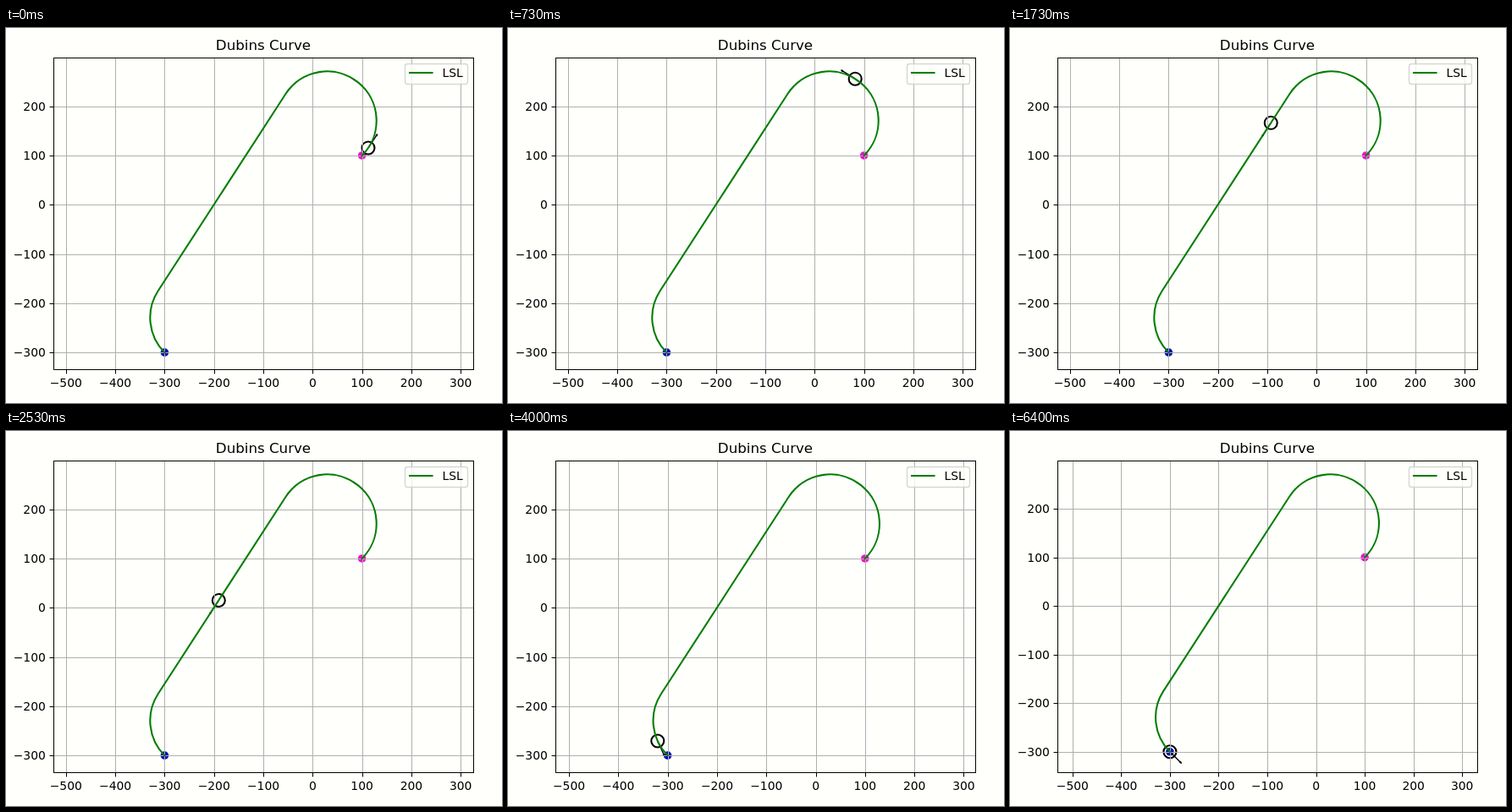
An HTML page for the animation above (6470 ms loop, 586x444 px).

```html
<!DOCTYPE html>
<html lang="en">
<head>
<meta charset="utf-8">
<title>Dubins Curve</title>
<style>
  html, body { margin: 0; width: 100%; height: 100%; overflow: hidden; background: #fffffc; }
  svg { display: block; width: 586px; height: 444px; }
  text { font: 13.89px "DejaVu Sans", sans-serif; fill: #000; }
  .title { font-size: 16.67px; }
  .grid { stroke: #b0b0b0; }
  .tick, .frame { stroke: #000; fill: none; }
  .curve { stroke: #007d00; stroke-width: 2.08; fill: none; stroke-linecap: square; }
</style>
</head>
<body>
<svg id="stage" viewBox="0 0 586 444"></svg>
<script>
const LOOP = 6470, FPS = 15;
const BOX = { left: 56, right: 552, top: 34.6, bottom: 404.2 };
const MARGIN = 0.05, DOT = 5.6, RING = 13.2; // marker extents in data units

// Path: left arc, straight, left arc
const R = 100, A0 = Math.PI / 4, A2 = 7 * Math.PI / 4;
const START = [100, 100], END = [-300, -300];
const arcCentre = ([x, y], a) => [x - R * Math.sin(a), y + R * Math.cos(a)];
const onArc = ([x, y], a) => [x + R * Math.sin(a), y - R * Math.cos(a)];
const C1 = arcCentre(START, A0), C2 = arcCentre(END, A2);
const dx = C2[0] - C1[0], dy = C2[1] - C1[1];
const A1 = Math.atan2(dy, dx) + 2 * Math.PI;
const LEN = [R * (A1 - A0), Math.hypot(dx, dy), R * (A2 - A1)];
const JOIN1 = onArc(C1, A1), JOIN2 = onArc(C2, A1);

// Each segment is sampled every 10 units, closing with the end pose
const STEP = 10;
const poses = [];
for (let s = 0; s < LEN[0]; s += STEP) {
  const a = A0 + s / R;
  poses.push([...onArc(C1, a), a]);
}
for (let s = 0; s < LEN[1]; s += STEP)
  poses.push([JOIN1[0] + s * Math.cos(A1), JOIN1[1] + s * Math.sin(A1), A1]);
for (let s = 0; s < LEN[2]; s += STEP) {
  const a = A1 + s / R;
  poses.push([...onArc(C2, a), a]);
}
poses.push([...END, A2]);

// [tick, pose index]
const PACE = [[0, 2], [5, 9], [16, 25], [26, 41], [50, 76], [60, 92], [63, poses.length - 1]];

function poseAt(n) {
  const k = PACE.findIndex(p => p[0] > n);
  if (k < 0) return poses[poses.length - 1];
  const [n0, i0] = PACE[k - 1], [n1, i1] = PACE[k];
  return poses[Math.round(i0 + (i1 - i0) * (n - n0) / (n1 - n0))];
}

const svg = document.getElementById("stage");
const set = (el, attrs) => {
  for (const k in attrs) el.setAttribute(k, attrs[k]);
  return el;
};
const add = (tag, attrs, text) => {
  const el = set(document.createElementNS("http://www.w3.org/2000/svg", tag), attrs);
  if (text) el.textContent = text;
  return svg.appendChild(el);
};
const snap = v => Math.round(v) + 0.5;
const range = (a, b) => Array.from({ length: (b - a) / 100 + 1 }, (_, i) => a + 100 * i);
const label = v => String(v).replace("-", "\u2212");

const startDot = add("circle", { r: 4.8, fill: "#e619c8" });
const endDot = add("circle", { r: 4.8, fill: "#0a0ab0" });
const ring = add("circle", { r: 7.5, fill: "none", stroke: "#000", "stroke-width": 2.08 });
const arrow = add("path", { stroke: "#000", "stroke-width": 1.39, "stroke-linejoin": "round" });

const makeTick = anchor => v => ({
  v,
  grid: add("path", { class: "grid" }),
  mark: add("path", { class: "tick" }),
  text: add("text", { "text-anchor": anchor }, label(v))
});
const xTicks = range(-500, 300).map(makeTick("middle"));
const yTicks = range(-300, 300).map(makeTick("end"));

const curve = add("path", { class: "curve" });
add("rect", { class: "frame", x: 56.5, y: 35.5, width: 496, height: 369 });
add("text", { class: "title", x: 304, y: 26, "text-anchor": "middle" }, "Dubins Curve");
add("rect", { x: 471.5, y: 42.5, width: 74, height: 24, rx: 3, fill: "#fffffc",
  "fill-opacity": 0.8, stroke: "#ccc", "stroke-opacity": 0.8, "stroke-width": 1.39 });
add("path", { class: "curve", d: "M477 53H503.5" });
add("text", { x: 515.5, y: 58 }, "LSL");

function draw([x, y, a]) {
  // Equal aspect: height sets the scale, width is centred on the data
  const yMax = Math.max(C1[1] + R, y + RING), yMin = Math.min(END[1] - DOT, y - RING);
  const xMax = Math.max(C1[0] + R, x + RING), xMin = Math.min(C2[0] - R, x - RING);
  const span = yMax - yMin, mid = (xMin + xMax) / 2;
  const scale = (BOX.bottom - BOX.top) / (span * (1 + 2 * MARGIN));
  const px = v => (BOX.left + BOX.right) / 2 + (v - mid) * scale;
  const py = v => BOX.top + (yMax + MARGIN * span - v) * scale;
  const pt = ([u, v]) => px(u).toFixed(2) + " " + py(v).toFixed(2);
  const place = (el, u, v) => set(el, { cx: px(u), cy: py(v) });

  place(startDot, ...START);
  place(endDot, ...END);
  place(ring, x, y);

  const c = Math.cos(a), s = Math.sin(a);
  const ahead = (f, side) => pt([x + f * c - side * s, y + f * s + side * c]);
  set(arrow, { d: `M${ahead(0, 0)}L${ahead(30, 0)}L${ahead(30, 1)}L${ahead(33, 0)}L${ahead(30, -1)}L${ahead(30, 0)}` });

  for (const t of xTicks) {
    const p = snap(px(t.v));
    set(t.grid, { d: `M${p} 36V404` });
    set(t.mark, { d: `M${p} 405V409.5` });
    set(t.text, { x: px(t.v), y: 425 });
  }
  for (const t of yTicks) {
    const q = py(t.v), p = snap(q);
    const display = q < BOX.top ? "none" : "inline";
    set(t.grid, { d: `M57 ${p}H552`, display });
    set(t.mark, { d: `M51.5 ${p}H56`, display });
    set(t.text, { x: 46.8, y: Math.round(q + 5), display });
  }

  const r = R * scale;
  set(curve, { d: `M${pt(START)}A${r} ${r} 0 1 0 ${pt(JOIN1)}L${pt(JOIN2)}A${r} ${r} 0 0 0 ${pt(END)}` });
}

const t0 = performance.now();
function tick(now) {
  const t = Math.max(0, now - t0) % LOOP;
  draw(poseAt(Math.floor((t + 3.5) * FPS / 1000)));
  requestAnimationFrame(tick);
}
tick(t0);
</script>
</body>
</html>
```
